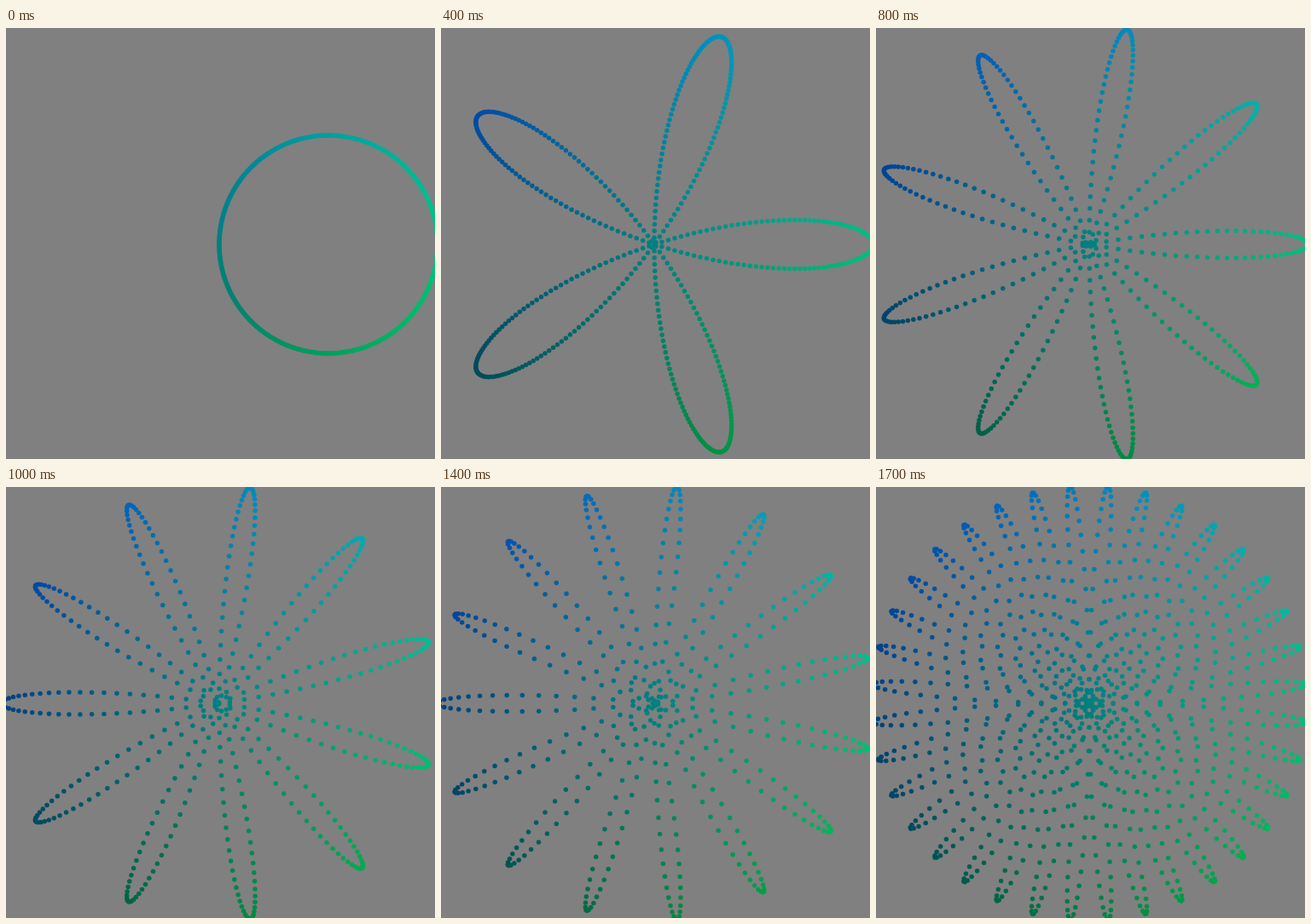
Write an HTML page with a canvas that moves like this. It is 503 px wide and 506 px high and loops after 1800 ms.

```html
<!DOCTYPE html>
<html lang="en">
<head>
<meta charset="utf-8">
<title>Dotted rose curves</title>
<style>
  html, body { margin: 0; width: 100%; height: 100%; overflow: hidden; background: #808080; }
  canvas { display: block; }
</style>
</head>
<body>
<canvas id="stage" width="503" height="506"></canvas>
<script>
const ctx = document.getElementById('stage').getContext('2d');
const W = 503, H = 506;
const CX = 250, CY = 254, R = 256;
const DOTS = 1024, DOT_R = 2.75;
const STEP_MS = 100, STEPS = 18;

// Green follows x, blue follows height.
function dotColor(x, y) {
  return `rgb(0,${Math.round(128 + 64 * x)},${Math.round(128 - 64 * y)})`;
}

function drawRose(k) {
  ctx.fillStyle = '#808080';
  ctx.fillRect(0, 0, W, H);
  // Odd roses retrace themselves after half a turn.
  const count = k % 2 ? DOTS / 2 : DOTS;
  for (let i = 0; i < count; i++) {
    const a = i / DOTS * 2 * Math.PI;
    const r = Math.sin(k * a);
    const x = r * Math.sin(a);
    const y = r * Math.cos(a);
    ctx.fillStyle = dotColor(x, y);
    ctx.beginPath();
    ctx.arc(CX + R * x, CY + R * y, DOT_R, 0, 2 * Math.PI);
    ctx.fill();
  }
}

const start = performance.now();
let shown = 0;

function tick() {
  const t = Math.max(0, performance.now() - start);
  const k = Math.floor(t / STEP_MS) % STEPS + 1;
  if (k !== shown) {
    drawRose(k);
    shown = k;
  }
  requestAnimationFrame(tick);
}
tick();
</script>
</body>
</html>
```
